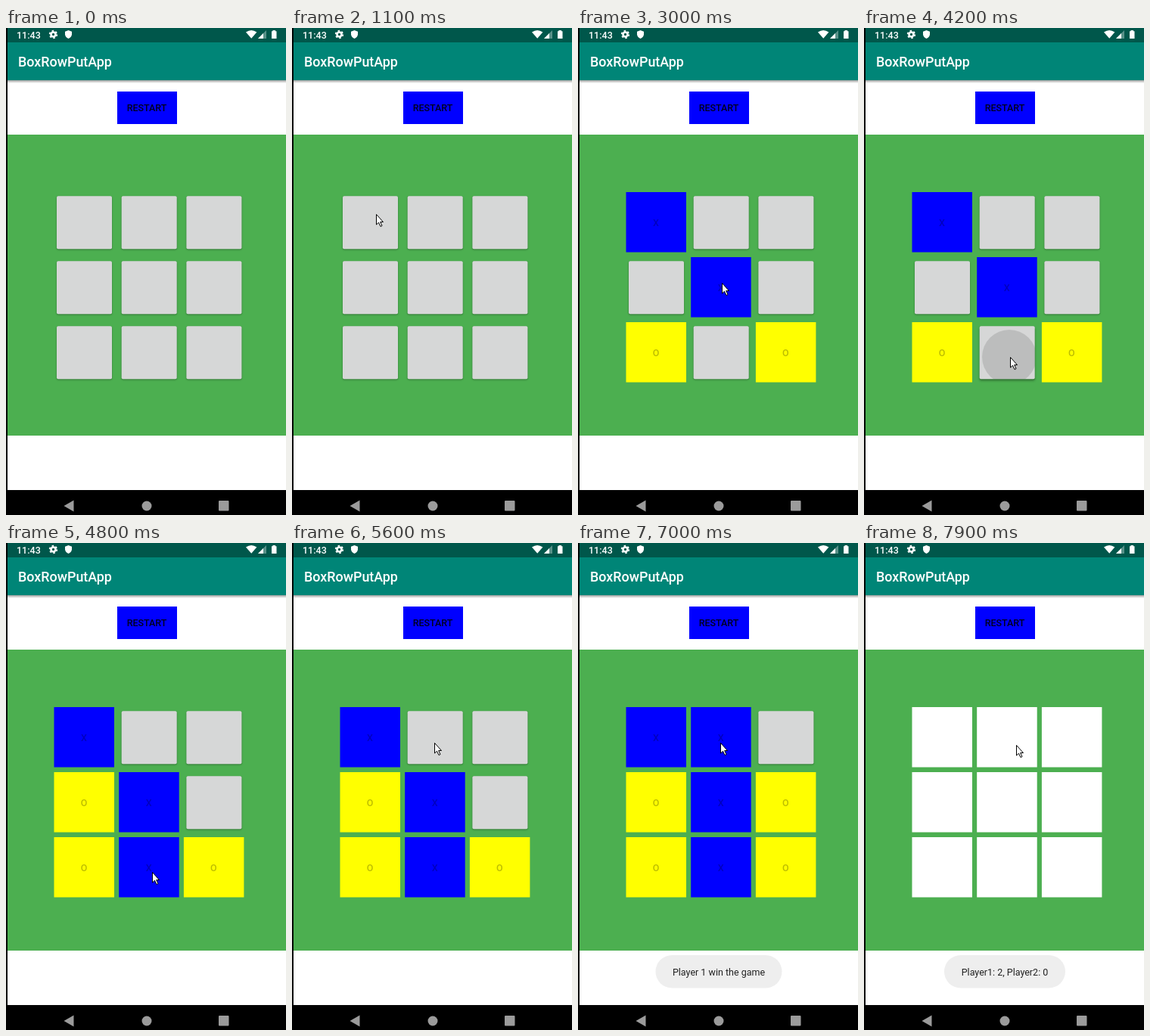
Recreate the animation shown at these times as an HTML page. Size 370 by 644 pixels, loop 8000 ms.

```html
<!DOCTYPE html>
<html lang="en">
<head>
<meta charset="utf-8">
<title>Three in a row</title>
<style>
html, body { margin: 0; width: 100%; height: 100%; overflow: hidden; background: #000; }
svg { display: block; width: 100%; height: 100%; font-family: Roboto, sans-serif; font-size: 12.5px; }
.medium { font-weight: 500; }
.mid { text-anchor: middle; }
.idle { filter: drop-shadow(0 1px .8px rgba(0,0,0,.32)); }
.pressed { filter: drop-shadow(0 2.5px 1.6px rgba(0,0,0,.38)); }
</style>
</head>
<body>
<svg viewBox="0 0 370 644">
  <defs>
    <linearGradient id="shade" x2="0" y2="1">
      <stop stop-opacity=".38"/><stop offset="1" stop-opacity="0"/>
    </linearGradient>
    <clipPath id="clip"><rect id="clipBox" width="73" height="70" rx="2"/></clipPath>
  </defs>

  <path fill="#fff" d="M2 69H370V611H2z"/>
  <path fill="#00574b" d="M2 0H370V19H2z"/>
  <path fill="#008577" d="M2 19H370V69H2z"/>
  <rect x="2" y="69" width="368" height="4" fill="url(#shade)"/>
  <path fill="#4caf50" d="M2 141H370V539H2z"/>

  <g fill="#fff">
    <text class="medium" x="14" y="13.5">11:43</text>
    <circle cx="62.5" cy="8.5" r="3" fill="none" stroke="#fff" stroke-width="2.6"/>
    <circle cx="62.5" cy="8.5" r="4.8" fill="none" stroke="#fff" stroke-width="1.8" stroke-dasharray="2.5 2.53"/>
    <path d="M82.5 3L87 4.8V8.5Q86.6 12.4 82.5 14Q78.400 12.4 78 8.500V4.800z"/>
    <path d="M317 5.500Q324.200 .500 331.400 5.500L324.200 13.800z"/>
    <path d="M344 3V14H333z" opacity=".35"/>
    <path d="M340 7V14H333z"/>
    <path d="M352.500 3H356V4.200H357.500V14H351V4.200H352.500z"/>
    <text class="medium" x="16" y="51" font-size="17.9">BoxRowPutApp</text>
  </g>

  <path fill="#00f" d="M147 84H226V127H147z"/>
  <text class="medium mid" x="186" y="110" fill-opacity=".87">RESTART</text>

  <g id="board"></g>

  <g id="toast">
    <rect id="pill" y="545" height="43.500" rx="21.700" fill="#eee"/>
    <text id="message" class="mid" x="186" y="572" fill="#222"></text>
  </g>

  <g fill="#9b9b9b">
    <path d="M76.500 632L89.500 624.500V639.500z"/>
    <circle cx="186" cy="632" r="6.500"/>
    <rect x="281" y="625" width="13.500" height="13.500" rx="1"/>
  </g>

  <path id="cursor" fill="#fff" stroke="#000" d="M.5 .5V14L3.500 11.200L6 16.500L8 15.500L5.700 10.500H9.500z"/>
</svg>
<script>
const LOOP = 8000, STEP = 100, PRESS = 200, CLEAR = 7200;
// time, square taken by X, square answered by O
const rounds = [[1400, 0, 8], [3000, 4, 6], [4300, 7, 3], [6000, 1, 5]];
// time, x, y of the pointer tip
const path = [
  [700, 372, 70], [900, 150, 135], [1100, 111, 246], [2000, 111, 246],
  [2200, 181, 303], [2400, 190, 337], [3200, 190, 337], [3600, 193, 435],
  [4900, 193, 435], [5500, 188, 264], [7500, 188, 264], [7800, 201, 267]
];
const $ = id => document.getElementById(id);
const clamp = v => Math.max(0, Math.min(1, v));
const ease = v => v * v * (3 - 2 * v);
const left = i => 63.5 + i % 3 * 85.7;
const top_ = i => 217 + Math.floor(i / 3) * 86;

function pointer(t) {
  const next = path.findIndex(p => p[0] > t);
  if (next === 0) return [372, 70];
  if (next < 0) return path[path.length - 1].slice(1);
  const [a, b] = [path[next - 1], path[next]];
  const k = ease((t - a[0]) / (b[0] - a[0]));
  return [a[1] + (b[1] - a[1]) * k, a[2] + (b[2] - a[2]) * k];
}

function square(i, fill, mark) {
  const x = left(i), y = top_(i);
  return `<rect x="${x}" y="${y}" width="79.500" height="79.500" fill="${fill}"/>` +
    `<text class="medium mid" x="${x + 39.5}" y="${y + 44.5}" fill-opacity=".26">${mark}</text>`;
}

function button(i, t, [px, py]) {
  const x = left(i) + 3.5, y = top_(i) + 5.3;
  const hit = rounds.find(r => r[1] === i && t >= r[0] - PRESS && t < r[0]);
  let out = `<rect class="${hit ? 'pressed' : 'idle'}" x="${x}" y="${y}" width="73" height="70" rx="2" fill="#d6d7d7"/>`;
  if (hit) {
    $('clipBox').setAttribute('x', x);
    $('clipBox').setAttribute('y', y);
    const r = 18 + 18 * (t - hit[0] + PRESS) / 100;
    out += `<circle cx="${px - 1}" cy="${py}" r="${r}" fill-opacity=".12" clip-path="url(#clip)"/>`;
  }
  return out;
}

function cell(i, t, tip) {
  if (t >= CLEAR) return square(i, '#fff', '');
  const done = rounds.find(r => t >= r[0] && (r[1] === i || r[2] === i));
  if (!done) return button(i, t, tip);
  return done[1] === i ? square(i, '#00f', 'X') : square(i, '#ff0', 'O');
}

function toast(t) {
  const second = t >= CLEAR + 200;
  const alpha = second ? clamp((t - CLEAR - 200) / 400)
    : Math.min(clamp((t - 6000) / 300), clamp((CLEAR + 200 - t) / 200));
  $('toast').setAttribute('opacity', alpha);
  $('message').textContent = second ? 'Player1: 2, Player2: 0' : 'Player 1 win the game';
  $('pill').setAttribute('x', second ? 106 : 102.5);
  $('pill').setAttribute('width', second ? 160 : 167);
}

function draw(now) {
  const t = Math.floor(now % LOOP / STEP) * STEP;
  const tip = pointer(t).map(Math.round);
  $('board').innerHTML = Array.from({ length: 9 }, (_, i) => cell(i, t, tip)).join('');
  toast(t);
  $('cursor').setAttribute('transform', `translate(${tip})`);
}

let start;
function tick(now) {
  start ??= now;
  draw(now - start);
  requestAnimationFrame(tick);
}
draw(0);
requestAnimationFrame(tick);
</script>
</body>
</html>
```
